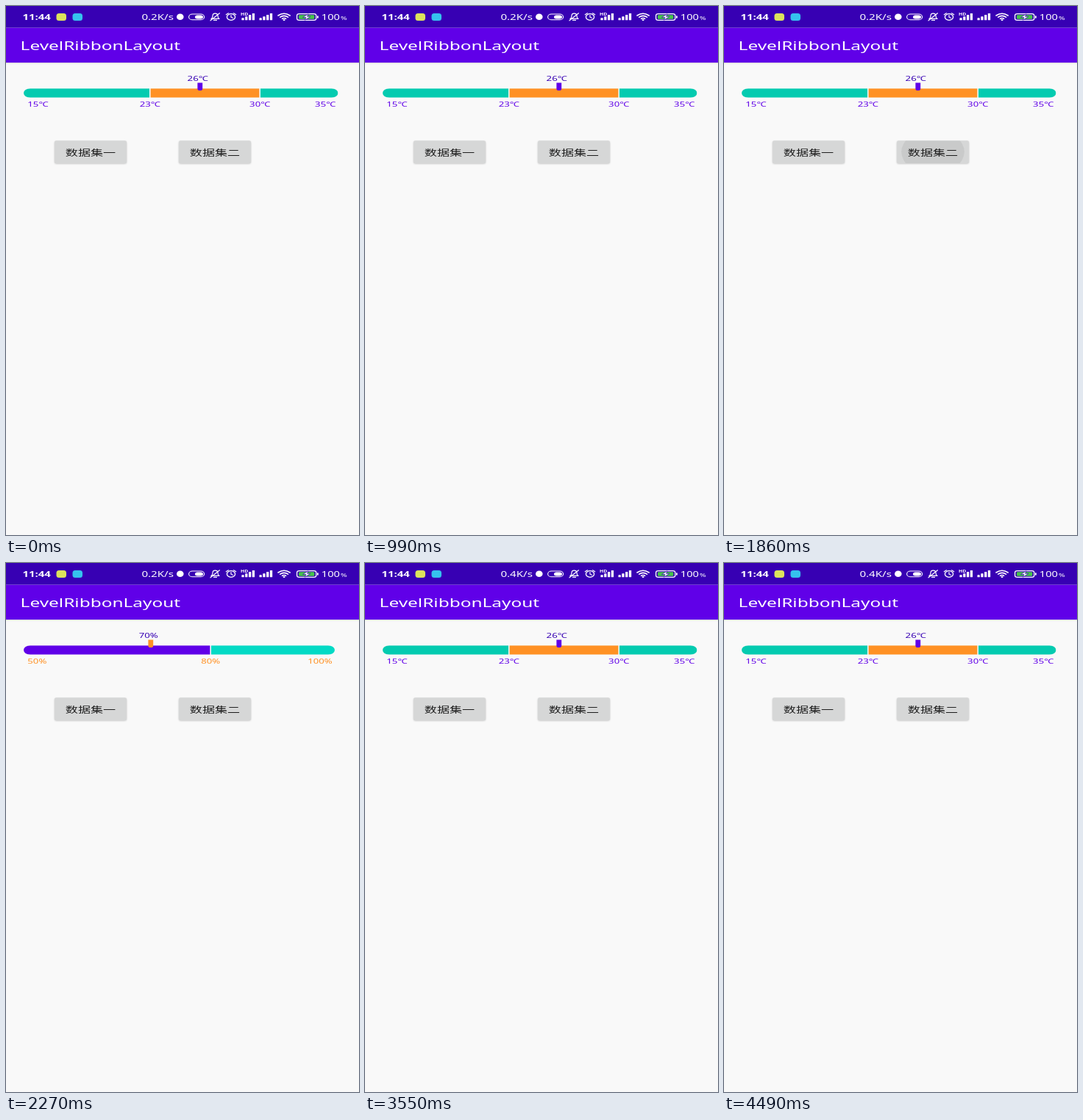
Write an HTML page that moves like this. It is 480 px wide and 720 px high and loops after 4530 ms.

```html
<!DOCTYPE html>
<html lang="zh">
<head>
<meta charset="utf-8">
<style>
  html, body { margin: 0; width: 100%; height: 100%; overflow: hidden; background: #f9f9f9; }
  svg { display: block; width: 480px; height: 720px; }
  text { font-family: "Noto Sans", "Noto Sans CJK SC", "Noto Sans CJK", sans-serif; }
</style>
</head>
<body>
<svg id="stage" viewBox="0 0 480 720"></svg>
<script>
const LOOP = 4530;
const DP_X = 1.222, DP_Y = 0.846; // the phone screen is squeezed vertically

const PURPLE = '#6000e8', INDIGO = '#3700b3', ORANGE = '#ff9124', PALE = '#f9f9f9';
const scales = [
  {
    end: 451.5, splits: [195.8, 345.2], fills: ['#04cbb0', ORANGE, '#04cbb0'],
    labels: ['15℃', '23℃', '30℃', '35℃'], ink: PURPLE,
    value: '26℃', marker: 263.8
  },
  {
    end: 447, splits: [278.2], fills: [PURPLE, '#03dac5'],
    labels: ['50%', '80%', '100%'], ink: ORANGE,
    value: '70%', marker: 196.8
  }
];
const buttons = [
  { x: 66, label: '数据集一', press: 2640 },
  { x: 235, label: '数据集二', press: 1800 }
];
const TAP = 80, FADE = 200;

const label = (str, x, y, size, fill, anchor = 'start', weight = 400, id = '') =>
  `<text ${id && `id="${id}"`} transform="translate(${x} ${y}) scale(${DP_X} ${DP_Y})"
    font-size="${size}" fill="${fill}" text-anchor="${anchor}" font-weight="${weight}">${str}</text>`;

const rect = (x, y, w, h, fill, extra = '') =>
  `<rect x="${x}" y="${y}" width="${w}" height="${h}" fill="${fill}" ${extra}/>`;

const line = (d, width = 1.2) =>
  `<path d="${d}" fill="none" stroke="#fff" stroke-width="${width}" stroke-linecap="round" stroke-linejoin="round"/>`;

function signal(x) {
  return [0, 1, 2, 3].map(i => {
    const h = 3 + 2.1 * i;
    return rect(x + 4.8 * i, 19.3 - h, 3.3, h, '#fff', 'rx="0.6"');
  }).join('');
}

function statusBar() {
  const white = '#fff';
  return rect(0, 0, 480, 29.5, INDIGO)
    + label('11:44', 22.5, 19, 12.2, white, 'start', 600)
    + rect(68.5, 10, 13.5, 10, '#dce35c', 'rx="3.5"')
    + rect(90.5, 10, 13.5, 10, '#35c3ee', 'rx="3.5"')
    + label('', 228, 19, 12.4, white, 'end', 500, 'speed')
    + `<ellipse cx="236.8" cy="14.7" rx="4.8" ry="4.3" fill="#fff"/>`
    // toggle
    + rect(248.6, 11, 21, 7.8, 'none', 'rx="5" ry="3.9" stroke="#fff" stroke-width="1.1"')
    + rect(257, 12.4, 11, 5, white, 'rx="3.4" ry="2.5"')
    // muted bell
    + line('M279 17.4 Q281 16.3 281 13.5 Q281 10.2 284.3 10.2 Q288 10.2 288 13.5 Q288 16.3 290 17.4 Z')
    + line('M282.5 19.4 H286.5 M278 19.8 L290.5 9.8')
    // alarm clock
    + `<ellipse cx="306" cy="15" rx="5.6" ry="4.3" fill="none" stroke="#fff" stroke-width="1.3"/>`
    + line('M306 12.7 V15.3 L308.5 16.2 M299.3 11.8 L302.5 9.8 M312.7 11.8 L309.5 9.8')
    + label('HD', 319, 13.2, 5.6, white, 'start', 600)
    + signal(320.4) + signal(344.5)
    // wifi
    + line('M370 13 Q378 7.6 386.2 13', 1.6)
    + line('M372.8 15.2 Q378 11.5 383.5 15.2', 1.6)
    + line('M375.5 17.3 Q378 15.6 380.7 17.3', 1.5)
    + '<ellipse cx="378.1" cy="18.9" rx="1.6" ry="1" fill="#fff"/>'
    // battery
    + rect(395.6, 10.6, 26.2, 8.8, 'none', 'rx="3.2" ry="2.4" stroke="#fff" stroke-width="1.3"')
    + rect(398, 12.3, 21.4, 5.4, '#45c44a', 'rx="1.2"')
    + rect(423, 13.2, 1.8, 3.6, white, 'rx="0.8"')
    + '<path d="M411 10.8 L403.5 15.6 H408 L406.5 19.3 L414 14.3 H409.6 Z" fill="#fff" stroke="#3700b3" stroke-width="0.7"/>'
    + label('100', 428.7, 19, 12.1, white, 'start', 500)
    + label('%', 455, 19, 8.6, white, 'start', 500);
}

function scaleView(s, i) {
  const edges = [24, ...s.splits, s.end];
  const last = s.labels.length - 1;
  const segments = s.fills.map((fill, n) =>
    rect(edges[n], 112.2, edges[n + 1] - edges[n], 12.5, fill)).join('');
  const gaps = s.splits.map(x => rect(x - 0.8, 112, 1.6, 13, PALE)).join('');
  const labels = s.labels.map((str, n) => {
    const x = n === 0 ? 29.3 : n === last ? s.end - 3.2 : edges[n];
    const anchor = n === 0 ? 'start' : n === last ? 'end' : 'middle';
    return label(str, x, 137, 10.8, s.ink, anchor);
  }).join('');
  const m = s.marker;
  return `<g id="scale${i}">
    <clipPath id="bar${i}">${rect(24, 112.2, s.end - 24, 12.5, '#000', 'rx="9" ry="6.2"')}</clipPath>
    <g clip-path="url(#bar${i})">${segments}</g>${gaps}${labels}
    <path d="M${m - 3.4} 104.5 h6.8 v8 q0 2.6 -3.4 2.6 q-3.4 0 -3.4 -2.6 z" fill="${i ? ORANGE : PURPLE}"/>
    ${label(s.value, m - 3.1, 101.8, 10.8, INDIGO, 'middle')}
  </g>`;
}

function buttonView(b, i) {
  const shape = (x, y, fill, extra) => rect(x, y, 98, 30.6, fill, `rx="2.4" ry="1.7" ${extra || ''}`);
  return `<g>
    ${shape(b.x, 184.2, '#000', 'opacity="0.22" filter="url(#soft)"')}
    ${shape(b.x, 183.3, '#d6d7d7')}
    <clipPath id="face${i}">${shape(b.x, 183.3, '#000')}</clipPath>
    <ellipse id="ripple${i}" clip-path="url(#face${i})" cx="${b.x + 49}" cy="198.6" fill="#000"/>
    ${label(b.label, b.x + 49, 203.6, 14, '#1c1c1c', 'middle', 500)}
  </g>`;
}

const stage = document.getElementById('stage');
stage.innerHTML = `
  <defs>
    <filter id="soft" x="-10%" y="-20%" width="120%" height="150%"><feGaussianBlur stdDeviation="0.9"/></filter>
    <linearGradient id="shade" x2="0" y2="1">
      <stop stop-color="#000" stop-opacity="0.12"/><stop offset="1" stop-color="#000" stop-opacity="0"/>
    </linearGradient>
  </defs>
  ${rect(0, 0, 480, 720, PALE)}
  ${rect(0, 77, 480, 2.5, 'url(#shade)')}
  ${rect(0, 29.5, 480, 47.5, PURPLE)}
  ${statusBar()}
  ${label('LevelRibbonLayout', 19.6, 59.6, 20, '#fff', 'start', 500)}
  ${scales.map(scaleView).join('')}
  ${buttons.map(buttonView).join('')}`;

const find = id => document.getElementById(id);
const speed = find('speed');
const scaleNodes = scales.map((_, i) => find('scale' + i));
const ripples = buttons.map((_, i) => find('ripple' + i));
const clamp = v => Math.max(0, Math.min(1, v));

function draw(t) {
  const shown = t >= buttons[1].press + TAP && t < buttons[0].press + TAP ? 1 : 0;
  scaleNodes.forEach((node, i) => node.setAttribute('visibility', i === shown ? 'visible' : 'hidden'));
  speed.textContent = t < 3050 ? '0.2K/s' : '0.4K/s';
  ripples.forEach((node, i) => {
    const age = t - buttons[i].press;
    const grow = clamp(age / 130);
    const fade = age < 0 ? 0 : 1 - clamp((age - TAP) / FADE);
    node.setAttribute('rx', 10 + 70 * grow);
    node.setAttribute('ry', 7 + 49 * grow);
    node.setAttribute('opacity', 0.06 * fade);
  });
}

const start = performance.now();
function tick() {
  draw((performance.now() - start) % LOOP);
  requestAnimationFrame(tick);
}
tick();
</script>
</body>
</html>
```
